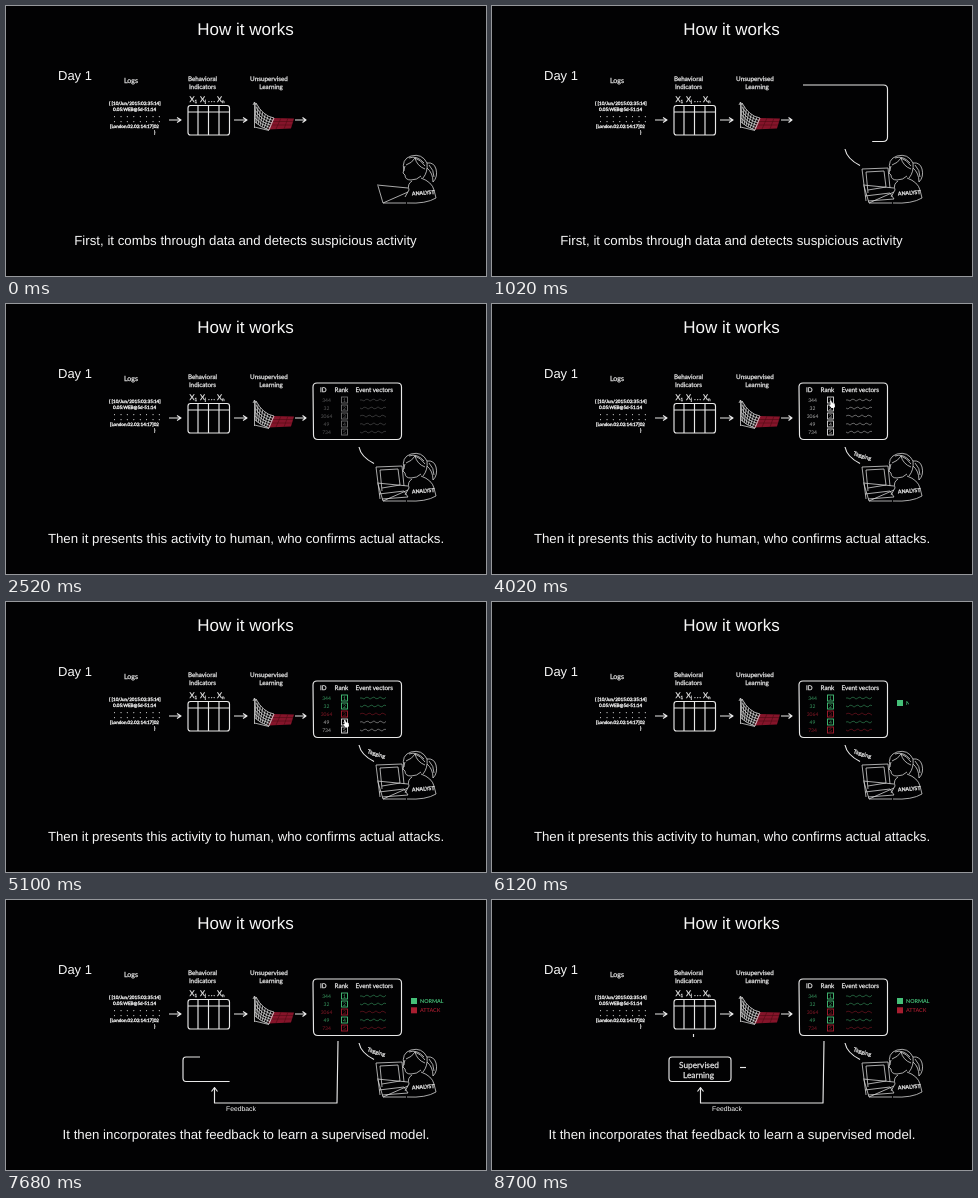
These frames come from a looping animation (480 px wide and 270 px high, 8.76 s). An HTML page:

```html
<!DOCTYPE html>
<html lang="en">
<head>
<meta charset="utf-8">
<title>How it works</title>
<style>
  /* One clock in ms drives every part. */
  @property --t { syntax: "<number>"; inherits: true; initial-value: 0; }
  @keyframes clock { from { --t: 0; } to { --t: 8760; } }

  html, body { margin: 0; width: 100%; height: 100%; overflow: hidden; background: #020203; }
  svg {
    display: block; width: 100vw; height: 100vh;
    animation: clock 8760ms steps(146) infinite;
    font: 6.3px Lato, "Open Sans", sans-serif;
    text-rendering: geometricPrecision;
    fill: #e8e8e8;
  }
  /* A fine outline gives the labels the weight of a marker pen. */
  text { stroke: #e8e8e8; stroke-width: .25; }
  .arial { font-family: "Liberation Sans", Arial, sans-serif; fill: #f6f6f6; }
  .arial, .arial text, .legend text, .row text { stroke: none; }
  .caption { font-size: 13.25px; }
  .mid { text-anchor: middle; }
  .ink { fill: none; stroke: #e8e8e8; stroke-width: 1.15; stroke-linejoin: round; }
  .thin { stroke-width: .8; stroke: #d4d4d4; }
  .tiny { font-size: 4.6px; }
  .tiny text { stroke-width: .35; }
  .dots { font-weight: bold; letter-spacing: 2.1px; }

  .show, .draw, .write { --at: -999; --dur: 240; --end: 99999; }
  .show {
    opacity: calc(clamp(0, (var(--t) - var(--at)) / var(--dur), 1)
                * clamp(0, (var(--end) - var(--t)) / var(--dur), 1));
  }
  .draw {
    stroke-dasharray: 100 300;
    stroke-dashoffset: calc(101px * (1 - clamp(0, (var(--t) - var(--at)) / var(--dur), 1)));
  }
  .write {
    clip-path: inset(-2px calc(100% * (1 - clamp(0, (var(--t) - var(--at)) / var(--dur), 1))) -2px 0);
  }
  .legend { font-size: 5.4px; font-weight: bold; }
  .row { fill: var(--c); stroke: var(--c); }
  .row text { font-size: 5px; }
  .row path, .row rect { fill: none; stroke-width: .9; }
  .row path { opacity: .5; }
  .row .id { opacity: .8; }
  #hand { transform: translateY(calc(8px * clamp(0, (var(--t) - 4140) / 360, 4))); }
</style>
</head>
<body>
<svg viewBox="0 0 480 270">
  <g class="arial">
    <text class="mid" x="239.5" y="28.8" font-size="17">How it works</text>
    <text x="52" y="73.6" font-size="13">Day 1</text>
    <g class="caption mid">
      <text class="show" x="239.5" y="239" style="--end:1680">First, it combs through data and detects suspicious activity</text>
      <text class="show" x="240" y="239" style="--at:1740;--end:6780">Then it presents this activity to human, who confirms actual attacks.</text>
      <text class="show" x="240" y="239" style="--at:6840">It then incorporates that feedback to learn a supervised model.</text>
    </g>
  </g>

  <!-- Logs -->
  <text class="mid" x="125" y="77" font-size="7">Logs</text>
  <g class="tiny">
    <text x="103" y="98.7">{ [10/Jun/2015:02:35:14]</text>
    <text x="107" y="105">0.05:WEB@5d-51:14</text>
    <text class="dots" x="108" y="110.5">. . . . . . . .</text>
    <text class="dots" x="108" y="115.5">. . . . . . . .</text>
    <text x="104" y="122">[London.02.02:14:17]02</text>
    <text x="148" y="128">}</text>
  </g>

  <!-- Indicators -->
  <g class="mid">
    <text x="196.5" y="75">Behavioral</text>
    <text x="196.5" y="82.7">Indicators</text>
  </g>
  <g font-size="7.8">
    <text x="183.5" y="95.5">X<tspan font-size="4.5" dy="1.5">1</tspan></text>
    <text x="194" y="95.5">X<tspan font-size="4.5" dy="1.5">j</tspan></text>
    <text x="202" y="95.5" letter-spacing=".8">...</text>
    <text x="211" y="95.5">X<tspan font-size="4.5" dy="1.5">n</tspan></text>
  </g>
  <g class="ink">
    <rect x="182" y="99.500" width="41.5" height="29.5" rx="2.500"/>
    <path d="M182 106H223.500M192 100V129M202.500 100V129M213 100V129"/>
    <path d="M163 114H174.500M171 111.500L175 114L171 116.500"/>
    <path d="M228 114H240.500M237 111.500L241 114L237 116.500"/>
    <path d="M289 114H300M296.500 111.500L300 114L296.500 116.500"/>
  </g>

  <!-- Unsupervised learning surface -->
  <g class="mid">
    <text x="263" y="75">Unsupervised</text>
    <text x="265" y="83.300">Learning</text>
  </g>
  <path d="M267 112L288 112.500L285 122.500L262 123.500Z" fill="#85142a"/>
  <path d="M267 115.500H287M265 119H286M275 112L270 123M282 112L278 123" fill="none" stroke="#4d0b14" stroke-width=".6"/>
  <path d="M248.500 122V96.500M247 99L248.500 96L250 99M248.500 121L263 124.500" class="ink thin"/>
  <path id="mesh" class="ink thin"/>

  <!-- Analyst -->
  <g class="ink thin">
    <path d="M398 165Q395 153 405 150Q416 147 421 157Q422 166 417 172"/>
    <path d="M400 159Q406 157 409 152Q411 160 419 163M403 152Q411 149 418 157M409 152Q415 154 419 160"/>
    <path d="M399 160L397 167L399 169Q399 174 405 174Q411 174 415 170"/>
    <path d="M421 157Q428 156 430 163Q432 171 427 176Q427 167 421 162M423 159Q428 164 428 171"/>
    <path d="M415 172Q426 176 428 184L430 192Q420 198 401 197M406 175Q401 178 403 184L399 191"/>
    <path d="M371 179L402 182M372 180L377 197L400 197M377 197L402 186"/>
    <path class="draw" pathLength="100" style="--at:60;--dur:260" d="M374 195L370 163L396 162L398 182"/>
    <path class="draw" pathLength="100" style="--at:240;--dur:220" d="M376 187L374 166L392 165L394 181L376 184"/>
    <path class="draw" pathLength="100" style="--at:360;--dur:140" d="M373 190L398 187L402 193L376 195"/>
  </g>
  <path class="ink draw" pathLength="100" style="--at:480;--dur:180" d="M353 143Q355 153 368 159.500"/>
  <text x="406" y="189.500" font-size="5.2" font-weight="bold" transform="rotate(-4 406 189)">ANALYST</text>
  <text class="write" style="--at:2880;--dur:600" x="361" y="151" font-size="5.6" transform="rotate(17 361 151)">Tagging</text>

  <!-- Screen -->
  <path class="ink draw" pathLength="100" style="--at:660;--dur:660"
    d="M311 79H391.500Q395.500 79 395.500 83V131Q395.500 135.500 391 135.500H312Q307.500 135.500 307.500 131L307 83Q307 79 311 79"/>
  <text class="write" style="--at:1380;--dur:120" x="314" y="88">ID</text>
  <text class="write" style="--at:1500;--dur:240" x="328.500" y="88">Rank</text>
  <text class="write" style="--at:1800;--dur:400" x="349.500" y="88">Event vectors</text>
  <g id="rows"></g>
  <g class="show" style="--at:3780;--dur:120;--end:5880">
    <path id="hand" fill="#fff" d="M338 96.500l1.200 0l.8 2.500l2.600 .6l.4 3l-1 1.400h-2.600l-2-2.800l.8-.8l.6 .4z"/>
  </g>

  <!-- Legend -->
  <g class="legend">
    <rect class="show" style="--at:5880;--dur:120" x="405" y="98" width="6" height="6" fill="#45c078"/>
    <text class="write" style="--at:6080;--dur:320" x="414" y="102.800" fill="#45c078">NORMAL</text>
    <rect class="show" style="--at:6360;--dur:120" x="405" y="107.300" width="6" height="6" fill="#a81e30"/>
    <text class="write" style="--at:6480;--dur:260" x="414" y="112.200" fill="#951a2b">ATTACK</text>
  </g>

  <!-- Feedback and supervised model -->
  <g class="ink">
    <path class="draw" pathLength="100" style="--at:6720;--dur:480" d="M332 141L331 203H208.500V188"/>
    <path class="show" style="--at:7140;--dur:60" d="M205.500 191.500L208.500 187.500L211.500 191.500"/>
    <path class="draw" pathLength="100" style="--at:7500;--dur:350"
      d="M194 157H180Q177 157 177 160V178Q177 181.500 180 181.500H236Q239 181.500 239 178V160Q239 157 236 157H194"/>
    <path class="draw" pathLength="100" style="--at:8580;--dur:120" d="M248 167.500H254"/>
    <path class="draw" pathLength="100" style="--at:8580;--dur:120" d="M201.500 134V137"/>
  </g>
  <text class="arial write" style="--at:7200;--dur:200" x="220" y="211" font-size="6.8">Feedback</text>
  <g font-size="8.3">
    <text class="write" style="--at:7860;--dur:300" x="187" y="168">Supervised</text>
    <text class="write" style="--at:8160;--dur:300" x="191" y="177.500">Learning</text>
  </g>
</svg>
<script>
  const GREEN = "#45c078", RED = "#a81e30", WHITE = "#dcdcdc";
  const steps = n => Array.from({ length: n + 1 }, (_, i) => i / n);

  // Surface: a family of falling curves joined by straight cross lines.
  const ends = u => [[250 - u, 97 + 19 * u], [257 - 3 * u, 110 + 11 * u], [268 - 5 * u, 112 + 12 * u]];
  const onCurve = (u, s) => {
    const [a, b, c] = ends(u);
    return [0, 1].map(k => (1 - s) ** 2 * a[k] + 2 * s * (1 - s) * b[k] + s * s * c[k]);
  };
  const curves = steps(5).map(u => {
    const [a, b, c] = ends(u);
    return `M${a}Q${b} ${c}`;
  });
  const ribs = steps(7).map(s => `M${onCurve(0, s)}L${onCurve(1, s)}`);
  document.getElementById("mesh").setAttribute("d", curves.concat(ribs).join(""));

  // Each row is drawn in white, then swapped for its tag colour.
  const wave = (y, i) => "M354 " + y + steps(13).slice(1).map((s, k) =>
    `L${354 + 26 * s} ${(y + 1.1 * Math.sin(k * 1.9 + i * 2)).toFixed(1)}`).join("");
  const row = (id, i, color, at, dur, end) => {
    const y = 96 + 8 * i;
    return `<g class="row show" style="--c:${color};--at:${at};--dur:${dur};--end:${end}">
      <text class="id mid" x="320.5" y="${y + 1.5}">${id}</text>
      <rect x="335.500" y="${y - 3}" width="6" height="6"/>
      <text class="mid" x="338.500" y="${y + 1.8}">${i + 1}</text>
      <path d="${wave(y, i)}"/></g>`;
  };
  document.getElementById("rows").innerHTML = [344, 32, 3064, 49, 734].map((id, i) => {
    const tag = 4140 + 360 * i;
    return `<g class="show" style="--at:2220;--dur:600">${row(id, i, WHITE, -999, 120, tag + 120)}</g>`
      + row(id, i, i === 2 || i === 4 ? RED : GREEN, tag, 120, 99999);
  }).join("");
</script>
</body>
</html>
```
